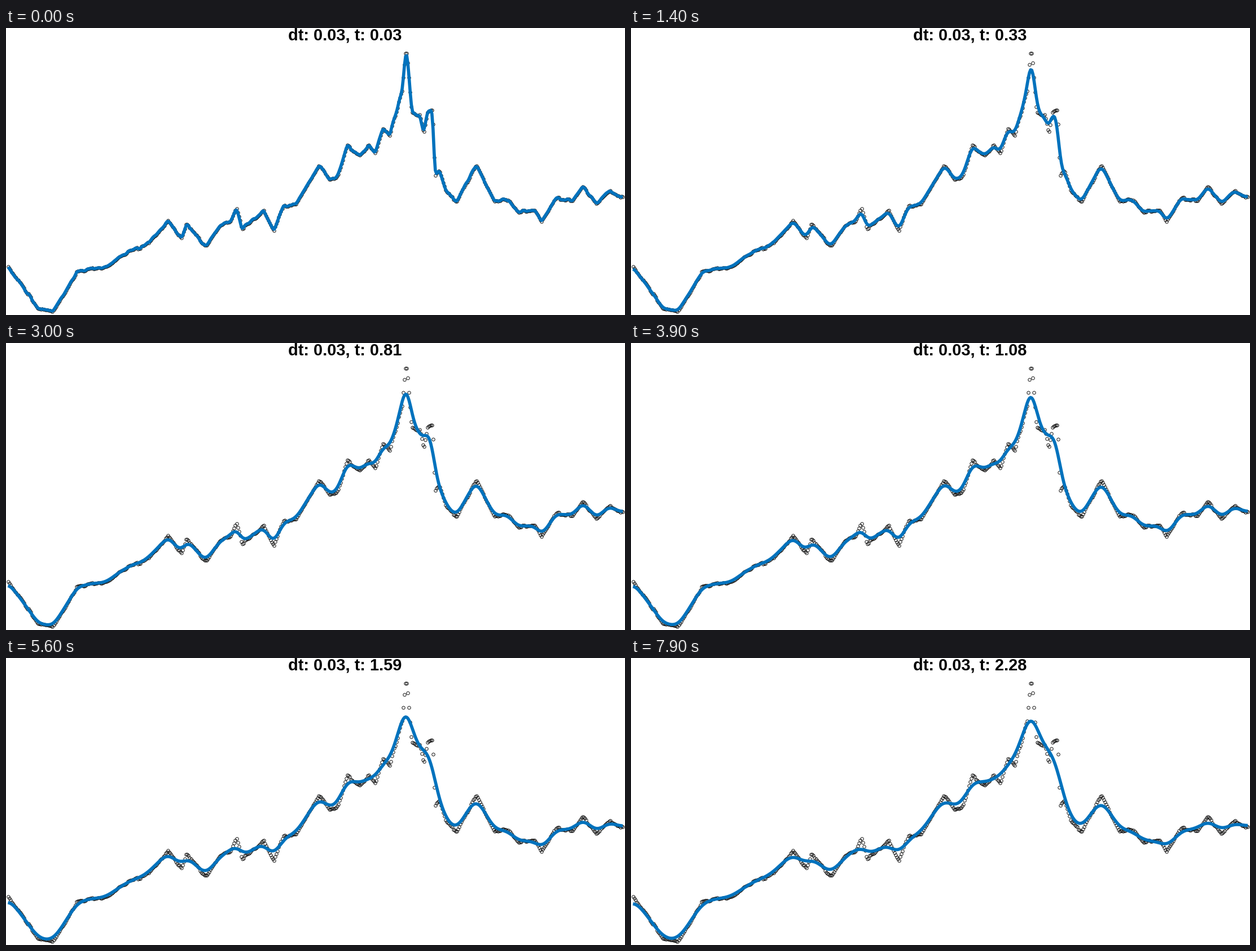
Animation of 1097x510 px, one loop 8 s. Source, as a matplotlib script:

```python
import matplotlib.pyplot as plt
import numpy as np
from matplotlib.animation import FuncAnimation

WIDTH, HEIGHT, DPI = 1097, 510, 64
PT = 72 / DPI            # points per pixel
FRAMES, INTERVAL = 80, 100
HOLD = 5                 # frames that show the first state
DT = 0.03
RATE = 0.25              # diffusion per step, in samples squared

# Main turning points of the signal, in stage pixels.
TURNS = np.array([
    (3, 423), (58, 499), (83, 504), (125, 434), (180, 423), (218, 397),
    (245, 388), (288, 343), (311, 374), (320, 349), (353, 388), (380, 350),
    (399, 344), (408, 320), (418, 356), (457, 325), (475, 359), (492, 316),
    (512, 314), (557, 243), (573, 270), (588, 264), (605, 209), (627, 227),
    (643, 208), (654, 222), (668, 178), (680, 189), (702, 113), (708, 45),
    (711, 45), (719, 150), (733, 156), (740, 187), (747, 147), (756, 146),
    (760, 262), (768, 254), (780, 291), (799, 308), (833, 242), (866, 308),
    (886, 303), (907, 326), (937, 323), (950, 343), (976, 302), (1004, 307),
    (1022, 281), (1047, 312), (1070, 289), (1093, 302),
])


def make_signal(count=539):
    """Sample the turning points evenly and add small stepped noise."""
    x = np.linspace(3.5, 1093, count)
    steps = np.random.default_rng(7).uniform(-2, 2, count)
    noise = np.repeat(steps, 3)[:count]
    noise[np.abs(x - 709) < 6] = 0
    return x, np.interp(x, *TURNS.T) + noise


def diffuse(y):
    """One explicit heat step with insulated ends."""
    flow = RATE * np.diff(y)
    return y + np.append(flow, 0) - np.insert(flow, 0, 0)


x, signal = make_signal()
states = [signal]
for _ in range(FRAMES):
    states.append(diffuse(states[-1]))

fig = plt.figure(figsize=(WIDTH / DPI, HEIGHT / DPI), dpi=DPI, facecolor="white")
ax = fig.add_axes([0, 0, 1, 1])
ax.set_xlim(0, WIDTH)
ax.set_ylim(HEIGHT, 0)
ax.axis("off")

ax.plot(x, signal, "o", ms=5.4 * PT, mfc="none", mec="black", mew=0.9 * PT)
curve, = ax.plot(x, signal, color="#0072BD", lw=5.6 * PT,
                 solid_capstyle="butt", solid_joinstyle="round")
title = ax.text(600.5, 21, "", ha="center", va="baseline", color="black",
                family="Liberation Sans", weight="bold", size=29 * PT)


def update(frame):
    step = max(1, frame - HOLD + 2)
    curve.set_ydata(states[step])
    title.set_text(f"dt: {DT:.2f}, t: {step * DT:.2f}")
    return curve, title


anim = FuncAnimation(fig, update, frames=FRAMES, interval=INTERVAL,
                     repeat=True, repeat_delay=0)
plt.show()
```
